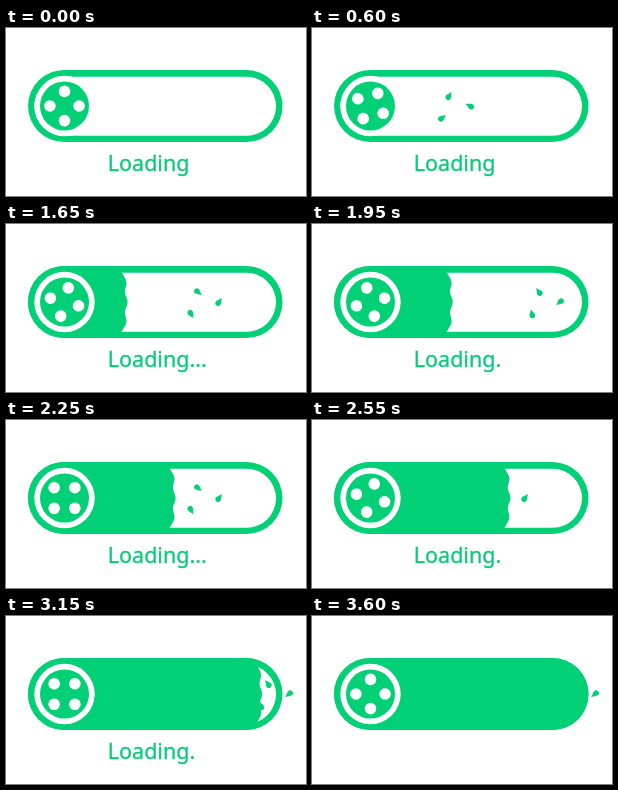
These frames come from a looping animation (300x168 px, 3750 ms). An HTML page:

```html
<!DOCTYPE html>
<html lang="en">
<head>
<meta charset="utf-8">
<title>Loading</title>
<style>
  html, body { margin: 0; width: 100%; height: 100%; overflow: hidden; background: #fff; }
  svg { display: block; width: 100vw; height: 100vh; }
  text { font: 21.5px "Noto Sans", "Open Sans", sans-serif; }
</style>
</head>
<body>
<svg viewBox="0 0 300 168" fill="#02d076">
  <defs>
    <clipPath id="bar"><rect x="22" y="42" width="254.5" height="72" rx="36"/></clipPath>
    <path id="drop" d="M0-5C1-2 2.8-.5 2.8 1.4A2.8 2.8 0 0 1-2.8 1.4C-2.8-.5-1-2 0-5Z"/>
  </defs>
  <rect x="22" y="42" width="254.5" height="72" rx="36"/>
  <rect x="28.5" y="48.8" width="241.5" height="59" rx="29.5" fill="#fff"/>
  <g id="drops"></g>
  <path id="liquid" clip-path="url(#bar)"/>
  <circle cx="58.5" cy="78" r="30.2" fill="#fff"/>
  <circle cx="58.5" cy="78" r="24.5"/>
  <g id="holes" fill="#fff"></g>
  <text id="label" x="101.8" y="143.2" fill="#08cb78" stroke="#08cb78" stroke-width=".3"></text>
</svg>
<script>
const STEP = 150, COUNT = 25;
const TOP = 48, HEIGHT = 60;
const $ = id => document.getElementById(id);

// Liquid front: step, x
const FRONT = [[7, 78], [13, 135.5], [21, 251], [23, 262], [24, 290]];

// One splash around its centre: dx, dy, rotation
const SPLASH = [[-6, -10, 30], [15, 0, -62], [-13, 12, 52]];

function frontAt(step) {
  const i = Math.max(1, FRONT.findIndex(([s]) => s >= step));
  const [s0, x0] = FRONT[i - 1], [s1, x1] = FRONT[i];
  return x0 + (x1 - x0) * (step - s0) / (s1 - s0);
}

// A bowed edge with three ripples
function liquidPath(step) {
  if (step < FRONT[0][0]) return "";
  const front = frontAt(step);
  let d = "M22 42";
  for (let y = 0; y <= HEIGHT; y++) {
    const u = y / HEIGHT;
    const bow = 4 * Math.sqrt(Math.max(0, Math.sin(Math.PI * u)));
    const ripple = -1.2 * Math.cos(6 * Math.PI * u);
    const x = (front + bow + ripple).toFixed(2);
    d += (y ? "" : `H${x}`) + `L${x} ${TOP + y}`;
  }
  return d + "V114H22Z";
}

// Drops fly left in four poses, then in three once space runs out
function splash(step) {
  if (step === 0) return "";
  const pose = step < 16 ? (step + 3) % 4 : step % 3;
  const cx = step < 20 ? 233 - 90 * (pose / 3) ** 2.33 : 268;
  return SPLASH.map(([dx, dy, turn]) => {
    const angle = turn + 98 * (3 - pose);
    return `<use href="#drop" transform="translate(${cx + dx} ${78 + dy}) rotate(${angle})"/>`;
  }).join("");
}

function draw(step) {
  $("holes").setAttribute("transform", `rotate(${-15 * step} 58.5 78)`);
  $("liquid").setAttribute("d", liquidPath(step));
  $("drops").innerHTML = splash(step);
  $("label").textContent = step === COUNT - 1 ? "" : "Loading" + ".".repeat(step % 4);
}

$("holes").innerHTML = [0, 90, 180, 270].map(a =>
  `<circle cx="58.5" cy="63.4" r="5.8" transform="rotate(${a} 58.5 78)"/>`).join("");

const start = performance.now();
let shown = -1;
function tick() {
  const step = Math.floor((performance.now() - start) / STEP) % COUNT;
  if (step !== shown) draw(shown = step);
  requestAnimationFrame(tick);
}
tick();
</script>
</body>
</html>
```
